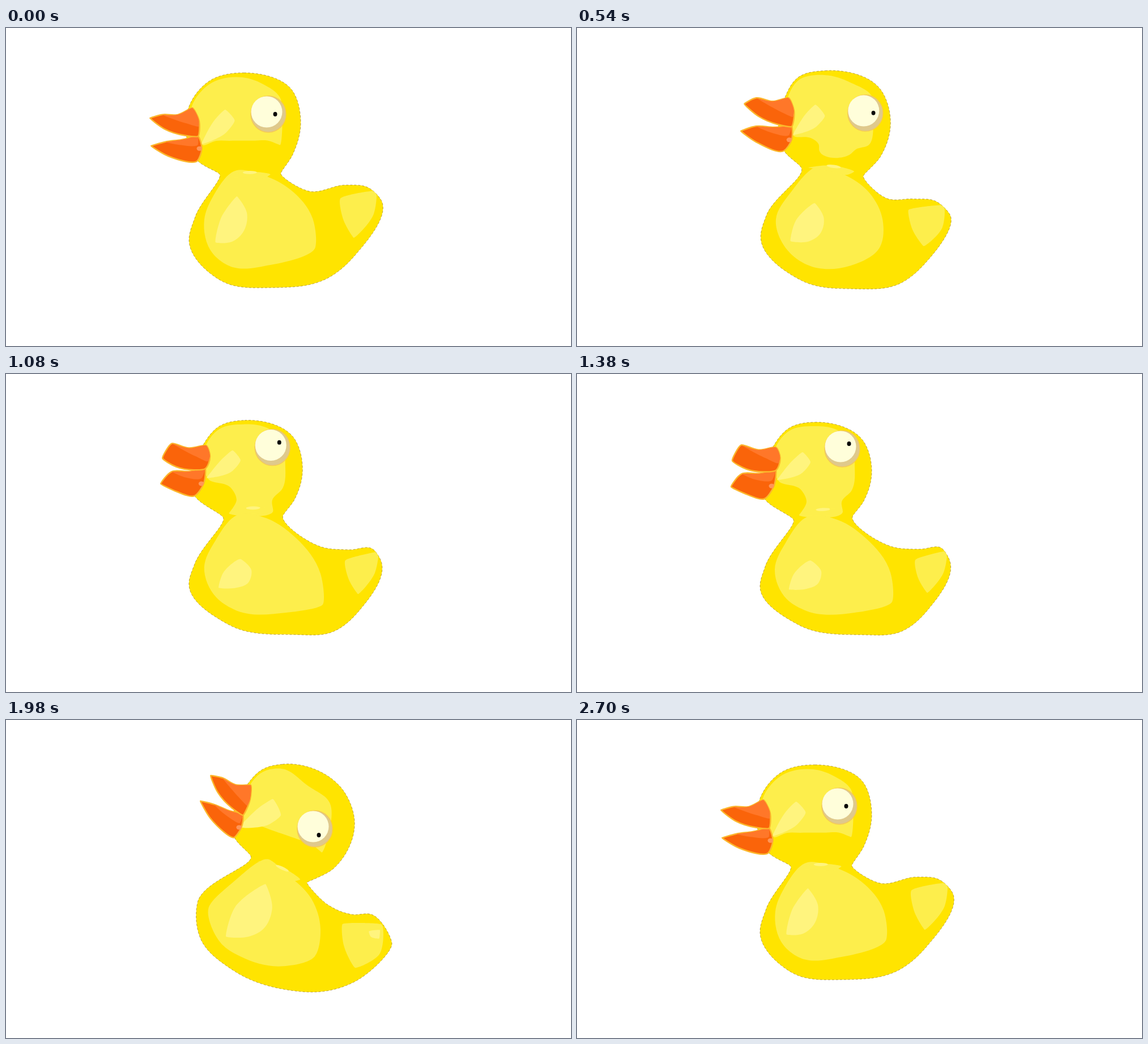
An HTML page with a canvas that plays this animation: 997 by 561 pixels, repeating every 2.73 s.

```html
<!DOCTYPE html>
<html lang="en">
<head>
<meta charset="utf-8">
<title>Rubber duck</title>
<style>
  html, body { margin: 0; width: 100%; height: 100%; overflow: hidden; background: #fff; }
  canvas { display: block; }
</style>
</head>
<body>
<canvas id="stage" width="997" height="561"></canvas>
<script>
const ctx = document.getElementById('stage').getContext('2d');
const LOOP = 2730, STEP = 30, CYCLE = 2700;
const BODY = '#ffe400', LIGHT = '#fdee4c', SHINE = '#fff47e';
const ORANGE = '#fa640a', PEACH = '#ff7729', RIM = '#fcb72c';

// Joints of the duck: the first nineteen run clockwise round the silhouette.
const JOINTS = ('top crown cheek jaw nape back hump rump tail rear keel belly breast left shoulder ' +
  'throat chin brow forehead upperTip lowerTip corner chest eye pupil').split(' ');
const OUTLINE = JOINTS.slice(0, 19), HANDLES = JOINTS.slice(0, 24);

// blunt: beak roundness, neck: highlight reaching the collar, side: flank facing the viewer.
const poses = [];
const pose = (time, blunt, neck, side, joints) =>
  poses.push({ time, values: [blunt, neck, side, ...joints] });

pose(0, 0, 0, 0, [420,79, 505,110, 520,165, 506,223, 485,257, 535,288, 600,277, 640,282, 661,302,
  615,402, 570,440, 470,458, 380,446, 323,375, 334,333, 377,258, 338,234, 329,141, 358,94,
  254,159, 256,208, 339,191, 549,370, 463,152, 475,152]);
pose(300, 0, 0, 0, [440,75, 540,110, 558,165, 540,230, 508,266, 541,295, 583,288, 620,295, 651,321,
  605,405, 562,443, 465,459, 395,449, 323,372, 334,333, 396,248, 376,226, 372,128, 385,89,
  293,136, 288,187, 386,184, 518,345, 521,161, 537,165]);
pose(780, 0.65, 1, 0, [432,77, 525,109, 541,165, 525,222, 498,256, 555,306, 605,312, 648,313, 665,333,
  624,423, 580,456, 510,461, 395,442, 325,365, 334,330, 392,248, 348,210, 367,122, 388,88,
  290,137, 284,182, 364,166, 558,390, 487,138, 499,133]);
pose(1380, 1, 1, 0, [420,85, 505,118, 520,170, 506,224, 486,252, 557,305, 605,309, 643,307, 656,325,
  620,415, 575,453, 500,460, 390,442, 323,375, 332,340, 382,257, 331,220, 352,130, 375,95,
  274,153, 272,199, 351,170, 559,385, 468,132, 480,123]);
pose(1980, 0, 0, 0.25, [488,78, 597,127, 615,178, 578,262, 531,287, 568,326, 610,343, 645,343, 681,394,
  620,459, 580,475, 490,475, 400,441, 343,385, 338,322, 432,240, 403,207, 432,115, 453,87,
  361,98, 343,143, 418,168, 548,400, 545,192, 552,203]);
pose(2310, 0, 1, 1, [436,84, 518,114, 535,160, 522,222, 493,258, 556,303, 620,312, 668,311, 682,335,
  640,437, 600,462, 515,465, 395,440, 327,360, 337,322, 395,248, 346,217, 353,135, 388,94,
  295,134, 289,179, 345,179, 620,405, 445,133, 443,126]);

const pairs = flat => flat.flatMap((x, i) => i % 2 ? [] : [[x, flat[i + 1]]]);
const clamp = v => Math.min(1, Math.max(0, v));

function build([blunt, neck, side, ...flat]) {
  const points = pairs(flat);
  const duck = Object.fromEntries(JOINTS.map((name, i) => [name, points[i]]));
  return Object.assign(duck, { blunt, neck: clamp(neck), side: clamp(side) });
}

// Markings are drawn once on the rest pose and follow the joints.
const rest = build(poses[3].values);
const marks = {
  head: pairs([418,92, 455,97, 485,118, 490,160, 485,205, 467,226, 469,243, 392,249, 405,225, 395,204, 357,190, 350,131, 375,100]),
  chest: pairs([412,250, 450,254, 510,290, 553,350, 556,402, 490,421, 400,416, 370,397, 349,345, 368,298]),
  collar: pairs([393,249, 430,238, 468,240, 460,246, 430,249]),
  tail: pairs([653,312, 647,350, 618,386, 602,360, 597,328, 625,318]),
  tailShine: pairs([646,318, 624,358, 588,376, 582,352]),
  chestShine: pairs([374,380, 382,354, 412,329, 431,348, 425,370, 405,379]),
  headShine: pairs([398,138, 412,155, 398,174, 353,187, 383,150])
};

function keyAt(i) {
  const n = poses.length, turn = Math.floor(i / n), key = poses[i - turn * n];
  return { time: key.time + turn * CYCLE, values: key.values };
}

// Smooth periodic interpolation through the poses.
function duckAt(t) {
  const i = poses.findLastIndex(p => p.time <= t);
  const [a, b, c, d] = [i - 1, i, i + 1, i + 2].map(keyAt);
  const span = c.time - b.time, u = (t - b.time) / span;
  const ease = u * u * (3 - 2 * u), start = u * (1 - u) ** 2, end = u * u * (u - 1);
  return build(b.values.map((v, k) => {
    const next = c.values[k];
    const m0 = (next - a.values[k]) / (c.time - a.time) * span;
    const m1 = (d.values[k] - v) / (d.time - b.time) * span;
    return v + (next - v) * ease + m0 * start + m1 * end;
  }));
}

// Moving least squares: each point follows the affine fit of its nearby joints.
function warp([x, y], duck) {
  const links = HANDLES.map(name => {
    const [px, py] = rest[name], [qx, qy] = duck[name];
    return { px, py, qx, qy, w: ((px - x) ** 2 + (py - y) ** 2 + 1) ** -1.5 };
  });
  const sum = f => links.reduce((total, link) => total + link.w * f(link), 0);
  const weight = sum(() => 1);
  const mean = key => sum(link => link[key]) / weight;
  const px = mean('px'), py = mean('py'), qx = mean('qx'), qy = mean('qy');
  const xx = sum(l => (l.px - px) ** 2), yy = sum(l => (l.py - py) ** 2);
  const xy = sum(l => (l.px - px) * (l.py - py));
  const det = xx * yy - xy * xy, dx = x - px, dy = y - py;
  const kx = (dx * yy - dy * xy) / det, ky = (dy * xx - dx * xy) / det;
  const pull = l => kx * (l.px - px) + ky * (l.py - py);
  return [qx + sum(l => pull(l) * (l.qx - qx)), qy + sum(l => pull(l) * (l.qy - qy))];
}

const mix = (p, q, k) => [p[0] + (q[0] - p[0]) * k, p[1] + (q[1] - p[1]) * k];

// A point along p-q, raised to the left of the direction of travel.
function lift(p, q, k, height) {
  const [x, y] = mix(p, q, k), dx = q[0] - p[0], dy = q[1] - p[1];
  const h = height / Math.hypot(dx, dy);
  return [x + dy * h, y - dx * h];
}

const grow = (points, sx, sy = sx, [cx, cy] = points[0]) =>
  points.map(([x, y]) => [cx + (x - cx) * sx, cy + (y - cy) * sy]);

// Closed curve through the points; sharp turns keep short handles.
function blob(points) {
  const n = points.length, path = new Path2D();
  const at = i => points[(i + n) % n];
  const edge = i => {
    const [x0, y0] = at(i), [x1, y1] = at(i + 1);
    const len = Math.hypot(x1 - x0, y1 - y0) || 0.001;
    return { x: (x1 - x0) / len, y: (y1 - y0) / len, len };
  };
  const tangent = i => {
    const a = edge(i - 1), b = edge(i), total = a.len + b.len;
    const x = (a.x * b.len + b.x * a.len) / total, y = (a.y * b.len + b.y * a.len) / total;
    const soft = Math.min(1, Math.hypot(x, y) / 0.9) ** 4 * 0.35;
    return [x * soft, y * soft];
  };
  path.moveTo(...at(0));
  for (let i = 0; i < n; i++) {
    const [x0, y0] = at(i), [x1, y1] = at(i + 1), { len } = edge(i);
    const [dx0, dy0] = tangent(i), [dx1, dy1] = tangent(i + 1);
    path.bezierCurveTo(x0 + dx0 * len, y0 + dy0 * len, x1 - dx1 * len, y1 - dy1 * len, x1, y1);
  }
  path.closePath();
  return path;
}

function oval([x, y], rx, ry, angle = 0) {
  const path = new Path2D();
  path.ellipse(x, y, rx, ry, angle, 0, Math.PI * 2);
  return path;
}

function paint(path, fill, stroke, width) {
  ctx.fillStyle = fill;
  ctx.fill(path);
  if (!stroke) return;
  ctx.strokeStyle = stroke;
  ctx.lineWidth = width;
  ctx.stroke(path);
}

function clipped(path, draw) {
  ctx.save();
  ctx.clip(path);
  draw();
  ctx.restore();
}

function drawMarks(duck) {
  const { neck, side, throat, nape } = duck;
  const follow = points => points.map(p => warp(p, duck));
  const drop = ([x, y]) => [x, y + 13 * (1 - neck)];
  const patch = (points, color) => paint(blob(points), color);

  // Without the neck, the lower edge closes into a shallow arc.
  const head = follow(marks.head);
  patch(head.map((p, i) =>
    i > 4 && i < 10 ? mix(lift(head[4], head[10], (i - 4) / 6, -8), p, neck) : p), LIGHT);
  patch(follow(marks.chest), LIGHT);
  patch(follow(marks.collar).map(drop), LIGHT);
  patch(follow(grow(marks.tail, 1 + 0.5 * side)), LIGHT);

  patch(grow(follow(marks.headShine), 1 + 0.6 * side), SHINE);
  patch(follow(grow(marks.chestShine, 1 + 0.9 * side, 1 + 0.6 * (1 - neck) + 0.75 * side)), SHINE);
  patch(follow(grow(marks.tailShine, side)), SHINE);
  const tilt = Math.atan2(nape[1] - throat[1], nape[0] - throat[0]);
  paint(oval(drop(warp([434, 239], duck)), 12.5, 2.8, tilt), SHINE);
}

function drawBeak({ upperTip, lowerTip, brow, corner, chin, blunt, side }) {
  const bulge = 7 * (1 - side);

  const lip = lift(lowerTip, corner, 0.3, 2 + 13 * blunt);
  const ridge = lift(lowerTip, corner, 0.65, 5 * blunt);
  const jowl = lift(corner, chin, 0.5, bulge);
  const under = lift(lowerTip, chin, 0.4, 5 * blunt - 8);
  const jaw = blob([lowerTip, lip, ridge, corner, jowl, chin, under]);
  paint(jaw, ORANGE, RIM, 2.5);
  clipped(jaw, () => {
    paint(blob([lip, ridge, corner, mix(corner, chin, 0.35), mix(ridge, under, 0.3)]), PEACH);
    paint(oval([jowl[0] - 4, jowl[1]], 5, 4), '#ff9658');
  });

  const bump = lift(upperTip, brow, 0.28, 1 + 21 * blunt);
  const dip = lift(bump, brow, 0.5, -6);
  const cheek = lift(brow, corner, 0.45, bulge);
  const fold = lift(upperTip, corner, 0.75, -7);
  const below = lift(upperTip, corner, 0.35, -9);
  const bill = blob([upperTip, bump, dip, brow, cheek, corner, fold, below]);
  paint(bill, ORANGE, RIM, 2.5);
  clipped(bill, () =>
    paint(blob([bump, dip, brow, cheek, mix(cheek, corner, 0.4), mix(dip, corner, 0.4)]), PEACH));
}

function drawEye([x, y], pupil) {
  paint(oval([x, y], 31, 32), '#dfc98c', '#f4ca58', 1.5);
  paint(oval([x - 3, y - 4], 27.5, 27.5), '#fffeda');
  paint(oval(pupil, 3.5, 3.9), '#080808');
}

function draw(t) {
  const duck = duckAt(t);
  ctx.clearRect(0, 0, 997, 561);

  const edge = OUTLINE.map(name => name === 'brow' ? [duck.brow[0] - 7, duck.brow[1]] : duck[name]);
  const silhouette = blob(edge);
  ctx.setLineDash([4, 3]);
  paint(silhouette, BODY, 'rgba(130, 95, 30, 0.65)', 0.8);
  ctx.setLineDash([]);

  clipped(silhouette, () => drawMarks(duck));
  drawBeak(duck);
  drawEye(duck.eye, duck.pupil);
}

function frame() {
  const t = performance.now() % LOOP;
  draw(Math.floor(t / STEP) * STEP % CYCLE);
  requestAnimationFrame(frame);
}
frame();
</script>
</body>
</html>
```
